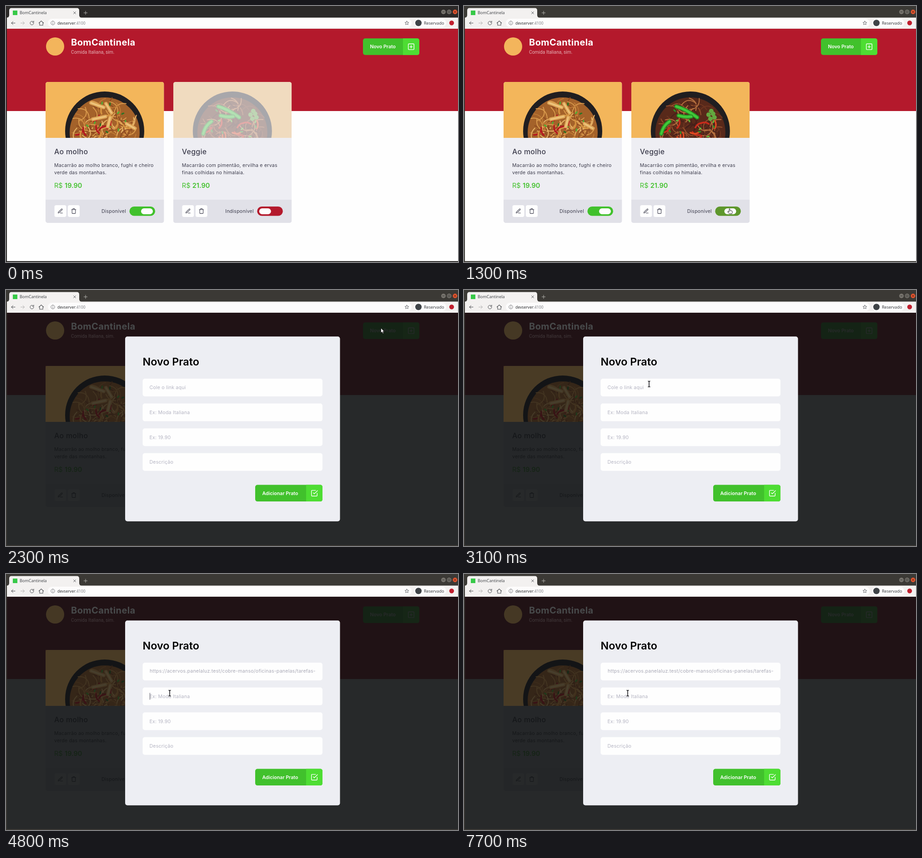
An HTML page for the animation above (8000 ms loop, 994 by 563 pixels).

```html
<!DOCTYPE html>
<html lang="pt">
<head>
<meta charset="utf-8">
<style>
  html, body { margin: 0; height: 100%; overflow: hidden; background: #fefefe; }
  svg { display: block; width: 994px; height: 563px; font: 10.6px Inter, sans-serif; }
  .body { letter-spacing: .02em; fill: #3d3d4d; }
  .hint { letter-spacing: .02em; fill: #b4b4c2; }
  .bold { font-weight: 600; }
  .ui { font-family: "Noto Sans", sans-serif; }
  .line { fill: none; stroke-width: 2; stroke-linecap: round; stroke-linejoin: round; }
  #link { display: flex; width: 364px; overflow: hidden; white-space: nowrap; line-height: 18px;
    letter-spacing: .02em; color: #a9a9b6; }
  #link.end { justify-content: flex-end; }
  #link.end u { text-decoration: underline dotted #d8404c 1.3px; text-underline-offset: 2px; }
  #link u { text-decoration: none; }
</style>
</head>
<body>
<script>
const ICONS = {
  pen: 'M12 20h9M16.5 3.5a2.1 2.1 0 0 1 3 3L7 19l-4 1 1-4Z',
  trash: 'M3 6h18M19 6v14a2 2 0 0 1-2 2H7a2 2 0 0 1-2-2V6m3 0V4a2 2 0 0 1 2-2h4a2 2 0 0 1 2 2v2',
  plus: 'M5 3h14a2 2 0 0 1 2 2v14a2 2 0 0 1-2 2H5a2 2 0 0 1-2-2V5a2 2 0 0 1 2-2ZM12 8v8M8 12h8',
  check: 'M9 11l3 3L22 4M21 12v7a2 2 0 0 1-2 2H5a2 2 0 0 1-2-2V5a2 2 0 0 1 2-2h11',
  back: 'M20 12H4M11 5l-7 7 7 7',
  forward: 'M4 12h16M13 5l7 7-7 7',
  reload: 'M20 12a8 8 0 1 1-3-6.2M20 3v6h-6',
  home: 'M2 12L12 3l10 9M5 10v11h14V10',
  info: 'M12 2a10 10 0 1 1 0 20a10 10 0 1 1 0-20M12 11v6M12 7v.5',
  star: 'M12 3l2.7 6 6.5.6-4.9 4.3 1.5 6.4L12 17l-5.8 3.3 1.5-6.4-4.9-4.3 6.5-.6Z',
  close: 'M6 6l12 12M18 6L6 18',
  add: 'M12 3v18M3 12h18'
};
const rect = (x, y, w, h, fill, r = 0, more = '') =>
  `<rect x="${x}" y="${y}" width="${w}" height="${h}" rx="${r}" fill="${fill}" ${more}/>`;
const circle = (x, y, r, fill) => `<circle cx="${x}" cy="${y}" r="${r}" fill="${fill}"/>`;
const text = (x, y, s, cls = 'body', style = '') =>
  `<text x="${x}" y="${y}" class="${cls}" style="${style}">${s}</text>`;
const icon = (name, x, y, scale, color) =>
  `<path class="line" stroke="${color}" d="${ICONS[name]}" transform="translate(${x} ${y}) scale(${scale}) translate(-12 -12)"/>`;
const stroke = (d, color, width) =>
  `<path d="${d}" fill="none" stroke="${color}" stroke-width="${width}" stroke-linecap="round"/>`;

function random(seed) {
  return () => (seed = (seed * 16807) % 2147483647) / 2147483647;
}

function bowl(seed, base, noodles, peppers, herbs) {
  const rnd = random(seed);
  let out = rect(0, 0, 260.5, 123, '#f3b65b') + circle(130, 108, 87, '#201e20') + circle(130, 111, 77, base);
  const scatter = (count, colors, length, width, bend) => {
    for (let i = 0; i < count; i++) {
      const a = rnd() * 6.28, d = 62 * Math.sqrt(rnd()), turn = rnd() * 6.28;
      const x = 130 + d * Math.cos(a), y = 108 + d * Math.sin(a);
      const dx = length * Math.cos(turn), dy = length * Math.sin(turn);
      out += stroke(`M${x - dx} ${y - dy}Q${x + dy * bend} ${y - dx * bend} ${x + dx} ${y + dy}`, colors[i % colors.length], width);
    }
  };
  scatter(100, noodles, 16, 2, 1);
  scatter(18, peppers, 9, 3.5, .6);
  scatter(20, herbs, 2, 3, .4);
  return out;
}

const chicken = ['M100 46l28 10', 'M133 48l12 20', 'M142 78l-5 20', 'M104 82l28-6', 'M178 92l18 10']
  .map(d => stroke(d, '#dda557', 8) + stroke(d, '#efc67f', 3)).join('');
const pods = ['M99 54Q120 60 145 78', 'M104 74Q118 78 132 76', 'M66 114Q70 96 84 87']
  .map(d => stroke(d, '#258f22', 9) + stroke(d, '#42c83a', 5)).join('')
  + [[170, 72], [180, 70], [174, 81], [183, 78], [176, 64]].map(([x, y]) => circle(x, y, 5, '#63a83f')).join('');
const photos = [
  bowl(11, '#a4622a', ['#d99a4c', '#bf7a35', '#e8b468', '#8e4a20'], ['#b5171f', '#d4923f'], ['#4fae34', '#2b7424']) + chicken,
  bowl(29, '#58291a', ['#94502c', '#6e3520', '#b5703f', '#45201a'], ['#c92b1b', '#dd4a22'], ['#5fba3a', '#2f8f27']) + pods
];

function card(i, x, name, lines, price) {
  return `<g transform="translate(${x} 167)" clip-path="url(#cardClip)">`
    + rect(0, 0, 260.5, 310, '#eeeef3') + `<g id="photo${i}" clip-path="url(#photoClip)">${photos[i]}</g>`
    + rect(0, 259, 260.5, 51, '#e1e1e8')
    + text(19, 159, name, 'body', 'font-size:15.9px;font-weight:500')
    + lines.map((s, n) => text(19, 187 + 16 * n, s)).join('')
    + text(19, 233, 'R$', '', 'font-size:14.5px;fill:#41c12c')
    + text(42, 233, price, 'bold', 'font-size:14.5px;fill:#41c12c')
    + rect(19.5, 271, 26, 26, '#fefefe', 4) + icon('pen', 32.5, 284, .54, '#3d3d4d')
    + rect(49, 271, 26, 26, '#fefefe', 4) + icon('trash', 62, 284, .54, '#3d3d4d')
    + text(177, 288, 'Disponível', 'body', 'text-anchor:end').replace('<text', `<text id="label${i}"`)
    + rect(184.5, 274, 56.5, 20.5, '#41c12c', 10.2, `id="track${i}"`)
    + rect(210, 278, 26, 13, '#fefefe', 6.5, `id="knob${i}"`) + '</g>';
}

const button = (x, y, w, split, label, mark) =>
  rect(x, y, w, 36.5, '#41c12c', 5)
  + `<path d="M${x + split} ${y}h${w - split - 5}q5 0 5 5v26.5q0 5-5 5h${split + 5 - w}Z" fill="#4edd33"/>`
  + text(x + 15.5, y + 22, label, 'bold', 'fill:#fff')
  + icon(mark, x + split + 18, y + 18.3, .7, '#fff');

const browser =
  rect(0, 0, 994, 563, '#2b2928', 0, 'id="frame"')
  + '<path d="M2 26Q7 25 7 20V10Q7 4.500 12 4.500H156Q161 4.500 161 10V20Q161 25 166 26Z" fill="#f3f1f0"/>'
  + rect(2, 25.5, 992, 24.5, '#f3f1f0')
  + rect(15, 10, 10, 10, '#37c948')
  + text(30, 18, 'BomCantinela', 'ui', 'font-size:9px;fill:#45484c')
  + icon('close', 151, 15, .42, '#45484c') + icon('add', 175, 15, .42, '#c9c7c4')
  + circle(962, 13, 5, '#77746e') + circle(974.5, 13, 5, '#77746e') + circle(987.5, 13, 5, '#e4552f')
  + stroke('M960 13h4M972.500 11h4v4h-4Z', '#33312e', 1) + stroke('M985.500 11l4 4m0-4l-4 4', '#4a1c0e', 1)
  + icon('back', 16, 37.5, .5, '#45484c') + icon('forward', 36.5, 37.5, .5, '#b3b2b2')
  + icon('reload', 57, 37.5, .5, '#45484c') + icon('home', 77.5, 37.5, .52, '#45484c')
  + rect(92, 28, 800, 18.5, '#fdfcfc', 9.2) + icon('info', 103, 37.3, .42, '#5b5e62')
  + text(113, 40.5, 'devserver<tspan fill="#7c7f83">:4100</tspan>', 'ui', 'font-size:8.6px;fill:#2d2f32')
  + icon('star', 881.5, 37.3, .46, '#55585c')
  + rect(898, 28, 70, 18.5, '#fdfcfc', 9.2) + circle(907, 37.3, 7, '#3f4347')
  + text(919, 40.7, 'Reservado', 'ui', 'font-size:9px;font-weight:500;fill:#3a3d41')
  + circle(980, 37.3, 5.2, '#c01f2e');

const page =
  rect(2, 50, 992, 511, '#fefefe') + rect(2, 50, 992, 181, '#b4192c')
  + '<g id="brand">' + circle(108, 89, 20, '#f3b55c')
  + text(143, 87, 'BomCantinela', '', 'font-size:20px;font-weight:700;letter-spacing:.02em;fill:#fff')
  + text(143, 105, 'Comida Italiana, sim.', '', 'font:10.25px Roboto,sans-serif;fill:#e5b3b8') + '</g>'
  + button(785, 71.3, 124, 88, 'Novo Prato', 'plus')
  + card(0, 87, 'Ao molho', ['Macarrão ao molho branco, fughi e cheiro', 'verde das montanhas.'], '19.90')
  + card(1, 367.8, 'Veggie', ['Macarrão com pimentão, ervilha e ervas', 'finas colhidas no himalaia.'], '21.90');

const fields = ['Cole o link aqui', 'Ex: Moda Italiana', 'Ex: 19.90', 'Descrição'].map((s, i) => {
  const y = 195 + 54.6 * i;
  return rect(300.5, y, 395.5, 39, '#fefefe', 5)
    + text(315.5, y + 23.3, s, 'hint').replace('<text', `<text id="hint${i}"`);
}).join('');

const modal = '<g id="modal">' + rect(2, 50, 992, 511, 'rgba(16,18,19,.9)')
  + '<use href="#brand" opacity=".15"/><use href="#photo0" x="87" y="167" opacity=".17"/>'
  + rect(262, 102.3, 472.5, 406.5, '#edeef3', 5)
  + text(300.5, 166, 'Novo Prato', 'bold', 'font-size:23.300px;fill:#000')
  + fields
  + `<foreignObject id="linkBox" x="316" y="205" width="364" height="20"><div id="link"><span>https://acervos.<u>panelaluz.test</u>/cobre-manso/<u>oficinas</u>-<u>panelas</u>/<u>tarefas</u>-sopa/<u>sopa1.png</u></span></div></foreignObject>`
  + rect(0, 0, 1, 15, '#55555f', 0, 'id="caret"')
  + button(548, 428.6, 148, 112, 'Adicionar Prato', 'check') + '</g>';

const cursors = '<g id="cursor" stroke="#111" stroke-width=".9" stroke-linejoin="round" fill="#fff">'
  + '<path id="arrow" d="M0 0V10.800L2.500 8.600 4.300 12.400 6 11.600 4.300 7.900H7.300Z"/>'
  + '<path id="hand" d="M-1 1Q0-.6 1 1V4.300L5 5.200Q6.600 5.800 6.200 8L5.200 11.300H-.5L-4 7.500Q-4.300 5.700-2.800 6.100L-1 7.500Z"/>'
  + '<path id="beam" d="M-2.500-6.300Q0-6.300 0-5V5Q0 6.300-2.500 6.300M2.500-6.300Q0-6.300 0-5V5Q0 6.300 2.500 6.300" fill="none" stroke="#2b2b2f" stroke-width="1.700"/></g>';

document.body.innerHTML = '<svg viewBox="0 0 994 563"><defs>'
  + `<clipPath id="cardClip">${rect(0, 0, 260.5, 310, '#000', 5)}</clipPath>`
  + `<clipPath id="photoClip">${rect(0, 0, 260.5, 123, '#000')}</clipPath></defs>`
  + browser + page + modal + cursors + '</svg>';

const $ = id => document.getElementById(id);
const show = (id, on) => { $(id).style.display = on ? '' : 'none'; };
const clamp = v => Math.max(0, Math.min(1, v));
const mix = (a, b, p) => a + (b - a) * p;
const within = (x, y, left, top, right, bottom) => x >= left && x <= right && y >= top && y <= bottom;

// Pointer moves: start, end, target x, target y
const MOVES = [[500, 900, 584, 445.5], [1600, 2200, 824.5, 83.5], [2500, 3200, 382.5, 214], [4100, 4600, 360, 262]];

function pointer(t) {
  let x = 618, y = 529;
  for (const [start, end, toX, toY] of MOVES) {
    const q = clamp((t - start) / (end - start)), p = q * q * (3 - 2 * q);
    x = mix(x, toX, p);
    y = mix(y, toY, p);
  }
  return [x, y];
}

function draw(t) {
  const open = t >= 2300, available = t >= 1200, pasted = t >= 3900, second = t >= 4800;
  $('frame').setAttribute('fill', t >= 1100 ? '#3b3935' : '#2b2928');

  const p = 1 - (1 - clamp((t - 1100) / 400)) ** 2;
  $('knob1').setAttribute('x', mix(189, 210, p));
  $('track1').setAttribute('fill', `rgb(${mix(180, 65, p)},${mix(25, 193, p)},44)`);
  $('photo1').setAttribute('opacity', available ? 1 : .34);
  $('label1').textContent = available ? 'Disponível' : 'Indisponível';

  show('modal', open);
  show('hint0', !pasted);
  show('linkBox', pasted);
  $('link').className = second ? '' : 'end';
  show('caret', [[3200, 4400], [4800, 5300], [5900, 6900], [7200, 7700]].some(([a, b]) => t >= a && t < b));
  $('caret').setAttribute('x', pasted && !second ? 679.5 : 316);
  $('caret').setAttribute('y', second ? 261.5 : 207.3);

  const [x, y] = pointer(t);
  const beam = open && (within(x, y, 300, 195, 696, 234) || within(x, y, 300, 249, 696, 289));
  const hand = !open && (within(x, y, 552, 441, 609, 462) || within(x, y, 785, 71, 909, 108));
  show('cursor', t >= 500);
  show('beam', beam);
  show('hand', hand);
  show('arrow', !beam && !hand);
  $('cursor').setAttribute('transform', `translate(${x} ${y})`);
}

const began = performance.now();
function tick() {
  const t = (performance.now() - began) % 8000;
  draw(Math.floor(t / 100) * 100);
  requestAnimationFrame(tick);
}
tick();
</script>
</body>
</html>
```
